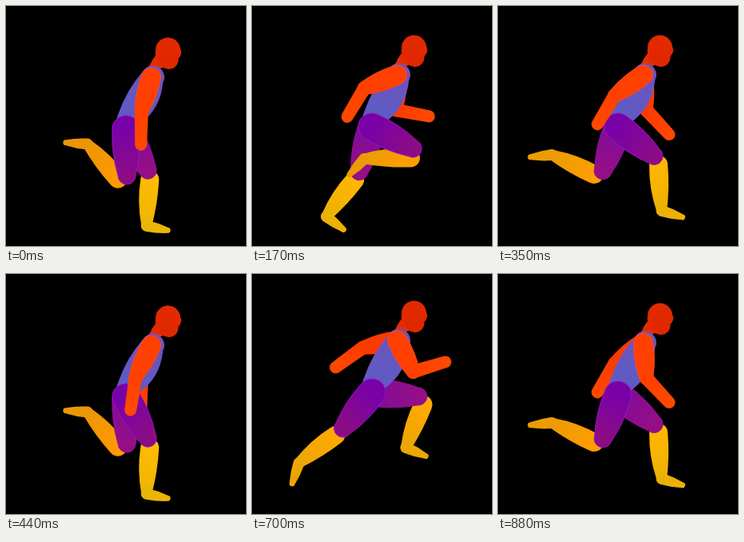
These frames come from a looping animation (300 px wide and 300 px high, 0.98 s). An HTML page with a canvas:

```html
<!DOCTYPE html>
<html>
<head>
<meta charset="utf-8">
<style>
html, body { margin: 0; width: 100%; height: 100%; overflow: hidden; background: #000; }
canvas { display: block; }
</style>
</head>
<body>
<canvas id="stage" width="300" height="300"></canvas>
<script>
const ctx = document.getElementById('stage').getContext('2d');
const LOOP = 980;
const STARTS = [0, 90, 170, 260, 350, 440, 520, 610, 700, 790, 880];
// Position in the stride at each step; a full stride is 8, the other side runs 4 ahead
const PHASES = [0, 0.5, 1, 2, 3, 4, 4.5, 5, 6, 6.5, 7];

// Bone angles through one stride, in degrees from straight down, positive forward
const STRIDE = {
  thigh: [1, 62, 85, 51, 28, -16, -39, -19],
  shin: [-139, -89, -22, 4, -4, -38, -53, -115],
  foot: [-94, -43, 67, 73, 78, 53, -18, -84],
  upperArm: [-16, -68, -78, -54, -26, -2, 27, 5],
  forearm: [-1, -31, -54, -31, -9, 79, 107, 43]
};
const LENGTH = { thigh: 58, shin: 58, foot: 27, upperArm: 44, forearm: 42 };

const mix = (a, b, t) => a + (b - a) * t;
const lerp = (p, q, t) => [mix(p[0], q[0], t), mix(p[1], q[1], t)];
const shift = ([x, y], dx, dy) => [x + dx, y + dy];
const move = (p, dir, d) => shift(p, Math.cos(dir) * d, Math.sin(dir) * d);
const swing = (p, degrees, d) => move(p, (90 - degrees) * Math.PI / 180, d);

function angleAt(part, phase) {
  const keys = STRIDE[part], i = Math.floor(phase);
  return mix(keys[i % 8], keys[(i + 1) % 8], phase - i);
}
const extend = (p, part, phase) => swing(p, angleAt(part, phase), LENGTH[part]);

// Rounded bone: radii at both ends, half widths of the two sides in the middle
function bone(a, b, [r0, back, front, r1], [c0, c1], edge) {
  const dir = Math.atan2(b[1] - a[1], b[0] - a[0]);
  const side = dir + Math.PI / 2, mid = lerp(a, b, 0.5);
  const bulge = w => 2 * w - (r0 + r1) / 2;
  ctx.beginPath();
  ctx.moveTo(...move(a, side, r0));
  ctx.quadraticCurveTo(...move(mid, side, bulge(back)), ...move(b, side, r1));
  ctx.arc(...b, r1, side, side - Math.PI, true);
  ctx.quadraticCurveTo(...move(mid, side, -bulge(front)), ...move(a, side, -r0));
  ctx.arc(...a, r0, side - Math.PI, side - 2 * Math.PI, true);
  ctx.closePath();
  const fill = ctx.createLinearGradient(...a, ...b);
  fill.addColorStop(0, c0);
  fill.addColorStop(1, c1);
  ctx.fillStyle = fill;
  ctx.fill();
  if (edge) {
    ctx.strokeStyle = edge;
    ctx.stroke();
  }
}

function drawArm(shoulder, phase, color, edge) {
  const elbow = extend(shoulder, 'upperArm', phase);
  const hand = extend(elbow, 'forearm', phase);
  bone(shoulder, elbow, [12, 12, 12, 8.5], [color, color], edge);
  bone(elbow, hand, [8.5, 8, 8, 7.5], [color, '#ff4800']);
}

function drawLeg(hip, phase, thigh, edge) {
  const knee = extend(hip, 'thigh', phase);
  const bend = (angleAt('thigh', phase) + angleAt('shin', phase)) / 2;
  const shinTop = swing(knee, bend, 12);
  const heel = extend(shinTop, 'shin', phase);
  const toe = extend(heel, 'foot', phase);
  const hue = 40 - 4 * Math.cos(phase * Math.PI / 4);
  const skin = `hsl(${hue}, 100%, 50%)`, sole = `hsl(${hue + 2}, 96%, 47%)`;
  bone(heel, toe, [7, 6, 6, 3.5], [sole, sole]);
  bone(shinTop, heel, [11.5, 11.5, 10.5, 6.5], [skin, sole]);
  bone(hip, knee, [17, 16.5, 16.5, 11], thigh, edge);
}

function draw(phase) {
  const bob = 3 * Math.cos(phase * Math.PI / 2);
  const head = [202.5, 56 + bob], hip = [150, 151 + bob];
  const shoulder = shift(head, -21, 30), ahead = phase + 4;
  ctx.fillStyle = '#000';
  ctx.fillRect(0, 0, 300, 300);
  drawArm(shoulder, ahead, '#fb3a00');
  drawLeg(hip, ahead, ['#7d0c9c', '#960e86'], '#8e109c');
  bone(shift(head, -6, 7), shift(head, -20, 18), [9, 8, 8, 4], ['#e02a00', '#e63000']);
  bone(shift(head, 0, -4), shift(head, 1, 8), [15.5, 16, 16, 12], ['#e22a00', '#e02800']);
  bone(shift(shoulder, 2, 0), shift(hip, 3, -12), [14, 17, 21, 14], ['#6a55bc', '#5d5cc4'], '#7a4fd0');
  drawLeg(hip, phase, ['#7802a8', '#8c0c84'], '#9a14c4');
  drawArm(shoulder, phase, '#ff4000', '#ff4a24');
}

function tick() {
  const t = performance.now() % LOOP;
  draw(PHASES[STARTS.findLastIndex(start => start <= t)]);
  requestAnimationFrame(tick);
}
tick();
</script>
</body>
</html>
```
